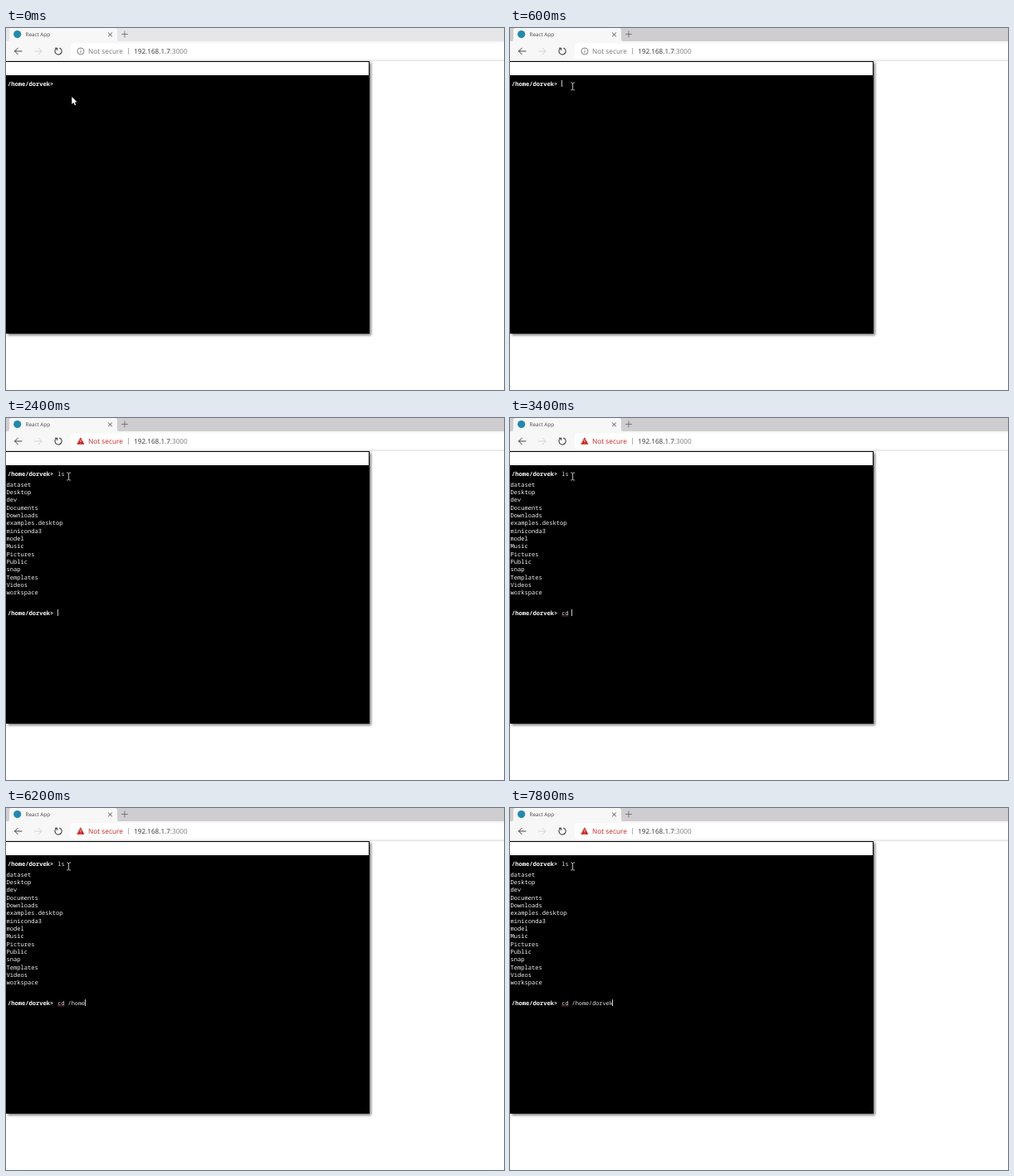
These frames come from a looping animation (600x437 px, 8 s). An HTML page:

```html
<!DOCTYPE html>
<html lang="en">
<head>
<meta charset="utf-8">
<title>Web terminal</title>
<style>
  html, body { margin: 0; width: 100%; height: 100%; overflow: hidden; background: #fff; }
  svg { display: block; width: 600px; height: 437px; }
  text { text-rendering: geometricPrecision; white-space: pre; }
  .ui { font-family: "Open Sans", "Noto Sans", sans-serif; }
  .mono { font: 7.08px "Noto Sans Mono", "DejaVu Sans Mono", monospace; fill: #f4f4f4; }
  .prompt { font-weight: 700; fill: #fff; }
  .typed { font-size: 6.83px; fill: #e8e8e8; }
  .line { fill: none; stroke-linecap: round; stroke-linejoin: round; }
  .window { filter: drop-shadow(2px 2px 1.6px rgba(0, 0, 0, .5)); }
  .crisp { shape-rendering: crispEdges; }
</style>
</head>
<body>
<svg viewBox="0 0 600 437">
  <!-- tab strip -->
  <rect id="strip" width="600" height="17" fill="#e6e6e8"/>
  <path d="M0 17Q4 17 4 13V3Q4 0 7 0H131Q134 0 134 3V13Q134 17 138 17Z" fill="#f7f7f7"/>
  <circle cx="13.7" cy="7.6" r="4.6" fill="#2389ad"/>
  <text class="ui" x="23.5" y="10.1" font-size="6.3" fill="#444">React App</text>
  <path class="line" d="M123.4 5.8l4.2 4.2m0-4.2l-4.2 4.2" stroke="#444" stroke-width=".9"/>
  <path class="line" d="M139.5 7.5h7m-3.5-3.5v7" stroke="#666" stroke-width=".8"/>

  <!-- toolbar -->
  <rect y="16" width="600" height="24" fill="#f7f7f7"/>
  <rect class="crisp" y="39" width="600" height="1" fill="#e2e2e2"/>
  <rect x="78" y="18.5" width="540" height="18.5" rx="3" fill="#fff"/>
  <path id="back" class="line" d="M19 28H10.5m3.8-3.8L10.5 28l3.8 3.8" stroke="#444" stroke-width="1"/>
  <path class="line" d="M34.5 28H43m-3.8-3.8L43 28l-3.8 3.8" stroke="#d4d4d4" stroke-width="1"/>
  <path class="line" d="M60.4 24.9A4.1 4.1 0 1 0 64.6 24.2M59.4 24.2h2.3v2.4" stroke="#444" stroke-width="1.1"/>
  <g id="info">
    <circle cx="90" cy="28" r="4" fill="none" stroke="#777" stroke-width=".9"/>
    <path d="M90 27.4v2.8m0-4.6v.9" stroke="#777" stroke-width=".9"/>
  </g>
  <g id="alert">
    <path class="line" d="M90 24.2l3.8 7.2h-7.6z" fill="#c5221f" stroke="#c5221f" stroke-width=".8" style="fill:#c5221f"/>
    <path d="M90 26.4v2.6m0 .8v.9" stroke="#fff" stroke-width=".8"/>
  </g>
  <text id="secure" class="ui" x="99" y="31" font-size="8.3">Not secure</text>
  <rect class="crisp" x="147" y="24" width="1" height="8" fill="#b5b5b5"/>
  <text class="ui" x="154.2" y="31" font-size="8.15" fill="#333">192.168.1.7<tspan fill="#7a7a7a">:3000</tspan></text>

  <!-- terminal -->
  <g class="window crisp">
    <rect y="40" width="438" height="329" fill="#000"/>
    <rect y="41" width="437" height="16" fill="#fff"/>
  </g>
  <text class="mono prompt" x="2" y="69.6">/home/dorvek&gt;</text>
  <text id="in0" class="mono typed" x="62.3" y="69.6"></text>
  <g id="output">
    <text class="mono prompt" x="2" y="237.7">/home/dorvek&gt;</text>
    <text id="in1" class="mono typed" x="62.3" y="237.7"></text>
  </g>
  <path id="spell" d="M62.5 239h8" stroke="#c8404a" stroke-width=".9" stroke-dasharray="1.3 .6"/>
  <rect id="caret" class="crisp" width="1" height="8" fill="#c4c4c4"/>

  <!-- pointers -->
  <path id="arrow" d="M79.3 83v9l2.1-1.9 1.5 3.2 1.3-.6-1.4-3.1h2.8z" fill="#fff"/>
  <path id="beam" class="line" d="M-2-4.5Q-.2-4.5 0-3.6Q.2-4.5 2-4.5M0-3.6V3.6M-2 4.5Q-.2 4.5 0 3.6Q.2 4.5 2 4.5" stroke="#d0d0d0" stroke-width=".9"/>
</svg>
<script>
const LOOP = 8000, INPUT_X = 62.3, CHAR = 4.1, ROW = 9.33;
const LINE_Y = [63, 231];
const FOCUS = 400, WARN = 1800, LISTED = 2400, MARKED = 3400;

const files = "dataset Desktop dev Documents Downloads examples.desktop miniconda3 model " +
  "Music Pictures Public snap Templates Videos workspace";

// [start ms, input line, typed so far, caret shown]
const steps = [
  [0, 0, "", 0],
  [400, 0, "", 1],
  [800, 0, "", 0],
  [1200, 0, "", 1],
  [1800, 0, "l", 1],
  [2000, 0, "ls", 1],
  [2200, 0, "ls", 0],
  [2400, 1, "", 1],
  [2800, 1, "", 0],
  [3000, 1, "c", 1],
  [3200, 1, "cd", 1],
  [3400, 1, "cd ", 1],
  [3800, 1, "cd ", 0],
  [4200, 1, "cd /", 1],
  [4600, 1, "cd /h", 1],
  [4800, 1, "cd /hom", 1],
  [5000, 1, "cd /home", 1],
  [5600, 1, "cd /home", 0],
  [6200, 1, "cd /home", 1],
  [6400, 1, "cd /home/", 1],
  [6800, 1, "cd /home/d", 1],
  [7000, 1, "cd /home/do", 1],
  [7200, 1, "cd /home/dor", 1],
  [7400, 1, "cd /home/dorve", 1],
  [7800, 1, "cd /home/dorvek", 1]
];

const $ = id => document.getElementById(id);
const show = (id, on) => $(id).setAttribute("visibility", on ? "visible" : "hidden");

files.split(" ").forEach((name, i) => {
  const row = document.createElementNS("http://www.w3.org/2000/svg", "text");
  row.setAttribute("class", "mono");
  row.setAttribute("x", .5);
  row.setAttribute("y", 82.7 + i * ROW);
  row.textContent = name;
  $("output").append(row);
});

function draw(t) {
  const [, line, typed, caret] = steps.findLast(s => s[0] <= t);
  $("in0").textContent = line ? "ls" : typed;
  $("in1").textContent = line ? typed : "";
  $("caret").setAttribute("x", Math.floor(INPUT_X + typed.length * CHAR));
  $("caret").setAttribute("y", LINE_Y[line]);
  show("caret", caret);

  $("strip").setAttribute("fill", t < FOCUS ? "#e6e6e8" : "#cfcdd0");
  show("info", t < WARN);
  show("alert", t >= WARN);
  $("secure").setAttribute("fill", t < WARN ? "#777" : "#c5221f");
  show("output", t >= LISTED);
  show("spell", t >= MARKED);

  show("arrow", t < 200);
  show("beam", t >= 200);
  $("beam").setAttribute("transform", t < FOCUS ? "translate(77 75)" : "translate(75.6 70.5)");
}

function tick(now) {
  draw(now % LOOP);
  requestAnimationFrame(tick);
}
draw(0);
requestAnimationFrame(tick);
</script>
</body>
</html>
```
